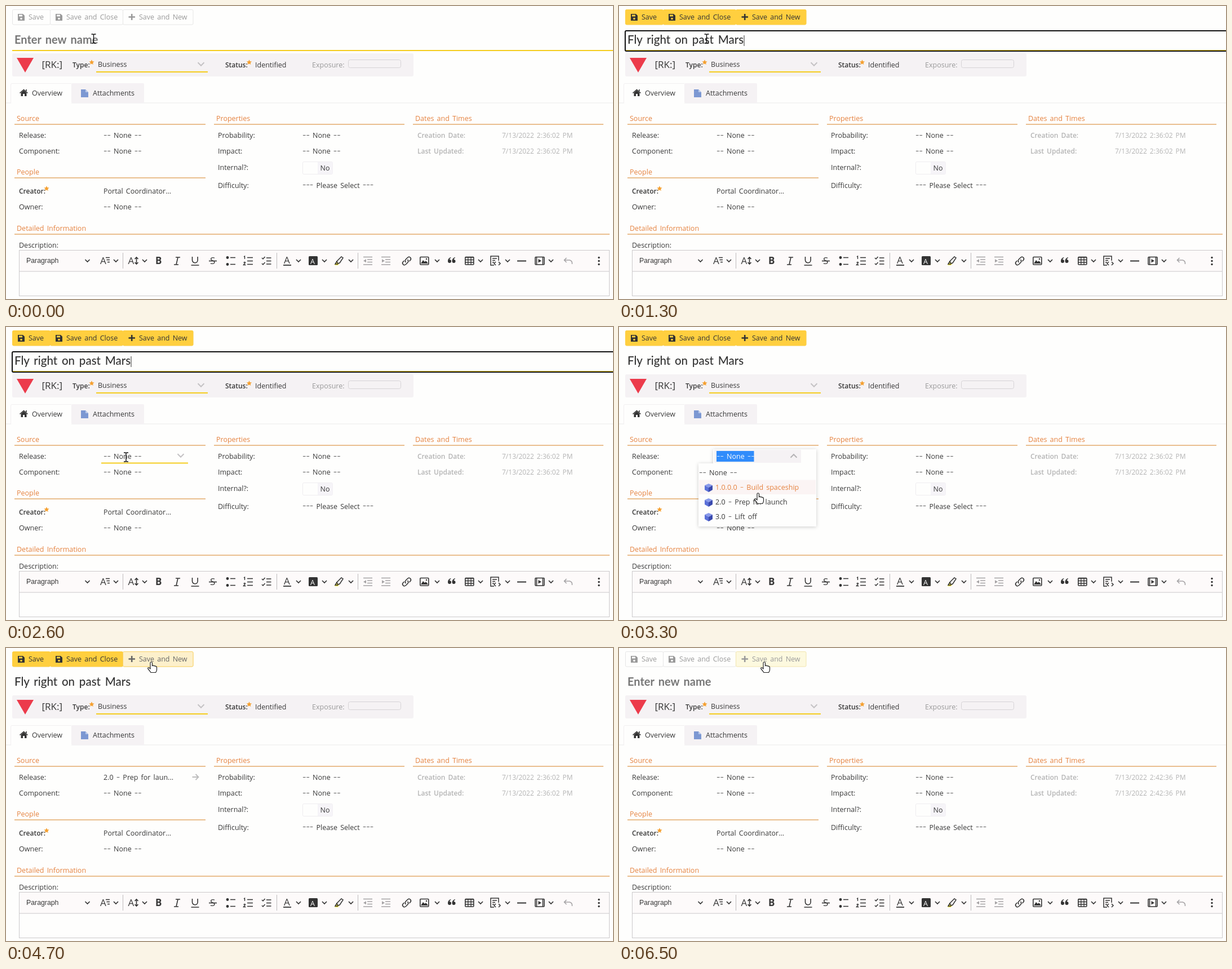
Recreate the animation shown at these times as an HTML page. Size 1077 px wide and 520 px high, loop 6.6 s.

```html
<!DOCTYPE html>
<html lang="en">
<head>
<meta charset="utf-8">
<title>New risk form</title>
<style>
html, body { margin: 0; width: 100%; height: 100%; overflow: hidden; background: #fefefd }
svg { display: block }
text { font: 12.5px "Open Sans", sans-serif; word-spacing: 1.9px; fill: #383838 }
.m { font-weight: 600; font-size: 12px }
.head { fill: #e5823f; font-weight: 500 }
.dim { fill: #b4b4b4 }
.date { fill: #b4b4b4; font-size: 12px }
.code { font-size: 17px }
.title { font: 500 20.5px Lato, sans-serif; word-spacing: 2.6px; fill: #333 }
.hint { font: 700 20px Lato, sans-serif; word-spacing: 2.4px; fill: #777 }
.para { font: 12.3px "Liberation Sans", sans-serif }
.glyph { font-size: 17px }
.bold { font-size: 17px; font-weight: 700 }
.dash { font-size: 20px; font-weight: 300 }
</style>
</head>
<body>
<svg width="1077" height="520" viewBox="0 0 1077 520"><g id="base"></g><g id="live"></g></svg>
<script>
const INK = '#333', GOLD = '#f5cd1e', PALE = '#f5f2f4';

const rect = (x, y, w, h, fill, more = '') =>
  `<rect x="${x}" y="${y}" width="${w}" height="${h}" fill="${fill}" ${more}/>`;
const line = (d, color = INK, w = 1.6) =>
  `<path d="${d}" fill="none" stroke="${color}" stroke-width="${w}"/>`;
const shape = (d, fill, more = '') => `<path d="${d}" fill="${fill}" ${more}/>`;
// Hyphens are set larger and lighter than the words around them.
const text = (x, y, s, cls = '', fill = '') =>
  `<text x="${x}" y="${y}" class="${cls}" ${fill && `style="fill:${fill}"`}>` +
  s.split(/(-+)/).map((part, i) => i % 2
    ? `<tspan class="dash" dy=".8">${part}</tspan>`
    : `<tspan dy="${i ? -.8 : 0}">${part}</tspan>`).join('') + '</text>';
const chevron = (x, y, r = 4, color = INK, dir = 1) =>
  line(`M${x - r} ${y - r / 2 * dir}l${r} ${r * dir}l${r} ${-r * dir}`, color, r > 4 ? 2 : 1.7);

function star(x, y) {
  const pts = Array.from({length: 10}, (_, i) => {
    const r = i % 2 ? 2.3 : 4.8, a = i * Math.PI / 5;
    return `${x + r * Math.sin(a)},${y - r * Math.cos(a)}`;
  });
  return `<polygon points="${pts}" fill="#f5a030"/>`;
}

const section = (x, y, w, s) =>
  text(x + 4, y, s, 'head') + rect(x, y + 5.3, w, 1.4, '#e3a562');

function header() {
  return rect(11, 84, 712, 41, PALE, 'rx="3"') +
    shape('M19 92H49L34 118Z', '#ec3b4b') +
    text(63.5, 110, '[RK:]', 'code') +
    text(118, 109, 'Type:', 'm') + star(152, 100) + text(163, 108, 'Business') +
    chevron(346, 103, 5.5, '#c4c2c4') + rect(160, 116, 198, 2, GOLD) +
    text(389, 109, 'Status:', 'm') + star(431.5, 100) + text(442, 109, 'Identified') +
    text(543, 109, 'Exposure:', '', '#999') +
    rect(607.5, 95.5, 93, 14, PALE, 'rx="3" stroke="#d6d3d6"');
}

function tabs() {
  return rect(0, 171.5, 1077, 1, '#ececec') +
    rect(8, 137, 109, 36, '#fefefd', 'rx="3"') +
    line('M8.5 172V140Q8.5 137.5 11 137.5H116', '#f2f0f1', 1) +
    rect(116, 137, 129, 35, PALE, 'rx="2"') +
    shape('M26.5 154L31.5 149.5L36.5 154V160H33V156H30V160H26.5Z', INK) +
    line('M24.5 154.5L31.5 148.5L38.5 154.5M36 148V151') +
    text(46, 159, 'Overview') +
    shape('M133 148H141L146 153V162H133Z', '#7c98d2') + shape('M141 148V153H146Z', '#b9c9ea') +
    text(154, 159, 'Attachments');
}

function fields() {
  const none = '-- None --';
  return section(15, 204, 339, 'Source') + section(15, 299, 339, 'People') +
    section(369, 204, 338, 'Properties') + section(722, 204, 338, 'Dates and Times') +
    section(15, 399, 1056, 'Detailed Information') +
    text(23, 234, 'Release:') + text(23, 262, 'Component:') + text(173, 262, none) +
    text(23, 333, 'Creator:', 'm') + star(72, 324) + text(173, 333, 'Portal Coordinator...') +
    text(23, 361, 'Owner:') + text(173, 361, none) +
    text(376, 234, 'Probability:') + text(526, 234, none) +
    text(376, 262, 'Impact:') + text(526, 262, none) +
    text(376, 290.5, 'Internal?:') +
    rect(526.5, 276.5, 53, 22, '#fefefd', 'rx="2" stroke="#efedf0"') +
    rect(553, 277, 26.5, 21, '#f6f4f8') + text(557.5, 292, 'No') +
    text(376, 322.5, 'Difficulty:') + text(526, 322.5, '--- Please Select ---') +
    text(730, 234, 'Creation Date:', 'm dim') + text(730, 262, 'Last Updated:', 'm dim') +
    text(23, 428.5, 'Description:');
}

function editor() {
  const gray = '#a5a3a5', rows = [446.5, 452.5, 458.5];
  const dots = (x, ys, r) => ys.map(y => `<circle cx="${x}" cy="${y}" r="${r}" fill="${INK}"/>`).join('');
  const frame = (x, w) => rect(x, 445.5, w, 13.5, 'none', `rx="1" stroke="${INK}" stroke-width="1.6"`);
  const indent = (x, dir) =>
    line(`M${x - 8} 445.5h16M${x - 1} 450h9M${x - 1} 454.5h9M${x - 8} 459h16`, gray) +
    shape(`M${x - 5 + 3 * dir} 452.3l${-5 * dir} -3v6Z`, gray);
  const quote = x => `M${x} 453a3 3 0 1 0 3-3q0-2 2.5-3l-.5-1q-5 1.5-5 7Z`;
  return rect(23.5, 433.5, 1047, 81, '#fefefd', 'stroke="#cbc9cb"') +
    rect(24, 434, 1046, 37, '#fdfafa') + rect(24, 470.5, 1046, 1, '#cbc9cb') +
    [207, 480, 624].map(x => rect(x, 438, 1, 28, '#bdbbbd')).join('') +
    text(36, 456, 'Paragraph', 'para') +
    [144.5, 195, 246, 519, 565, 612, 765, 842, 890, 967].map(x => chevron(x, 452)).join('') +
    text(167, 458, 'A', 'glyph') + line('M177 446.5h7M178.5 450.5h5.5M180 454.5h4') +
    text(216.5, 458, 'A', 'glyph') + line('M231.5 446v12M228.5 449l3-3 3 3M228.5 455l3 3 3-3') +
    text(265, 458, 'B', 'bold') +
    line('M301 446h8M298 459h8M305 446l-3 13') +
    line('M330.5 445v6a4.8 4.8 0 0 0 9.6 0v-6M328.5 460h14') +
    text(362, 458, 'S', 'glyph') + line('M360 452.5h14') +
    dots(393, [446.5, 458.5], 2.4) + line('M398 446.5h9M398 458.5h9') +
    line('M422 445l1.5-1v5M421.5 455.5q3-2 3 0l-3 4h4M428 446.5h10M428 452.5h10M428 458.5h10', INK, 1.4) +
    line('M454 447l2 2 3.5-4M454 457l2 2 3.5-4M462 447h8.5M462 452.5h8.5M462 458h8.5', INK, 1.5) +
    text(493, 457, 'A', 'glyph') + rect(492, 459, 14, 1.8, INK) +
    rect(537, 444, 16, 16, INK, 'rx="1.5"') + text(540, 457.5, 'A', '', '#fff') +
    shape('M583 460l4-6 4 3-2 3Z', '#f3e33c') +
    line('M587 453l8-8 3 2-6 9-3 1ZM587 453l-3 5h5', INK, 1.5) +
    indent(642, -1) + indent(674, 1) +
    line('M709.5 455q-2.5-3 0-5.5l3-3q3-2.5 5 0t0 4.5l-2 2M712.5 450q2.5 3 0 5.5l-3 3q-3 2.5-5 0t0-4.5l2-2') +
    frame(734.8, 15) + shape('M736 457l4-6 3 3 2-2 4 5Z', INK) + dots(746, [449], 1.3) +
    shape(quote(784) + quote(791.5), INK) +
    frame(814.8, 15) + line('M815 446h15M815 450.5h15M815 455h15M819.8 446v13M825 446v13', INK, 1.3) +
    line('M866 460h-6v-16h14v8M863 448h8M863 451.5h5M863 455h3', INK, 1.5) +
    line('M869 454l-3 3 3 3M874 454l3 3-3 3', INK, 1.5) +
    rect(907, 451.5, 16, 2, INK) +
    frame(939, 16) + line('M941.5 446v13M952.5 446v13') + shape('M944.5 449v6.5l5.5-3.2Z', INK) +
    line('M994.5 447l-4 4 4 4M991 451h9q5 1 4.5 7', gray) +
    dots(1052, rows, 1.7);
}

const floppy = (x, c, hole) =>
  shape(`M${x} 14h9l3 3v9h-12Z`, c) +
  rect(x + 2, 15.5, 6, 3, hole) + `<circle cx="${x + 6}" cy="22.5" r="1.8" fill="${hole}"/>`;

const button = (x, w, s, [fill, edge, ink]) =>
  rect(x + .5, 6.5, w, 26.5, fill, `rx="2" stroke="${edge}"`) +
  (s === 'Save and New'
    ? line('M217.5 19.5h11.5M223.2 14v11', ink, 2.6)
    : floppy(x + 10, ink, fill)) +
  text(x + 29, 24, s, '', ink);

const toolbar = (style, last = style) =>
  button(11, 67, 'Save', style) + button(78, 129, 'Save and Close', style) +
  button(207, 124.5, 'Save and New', last);

const OFF = ['#fefefd', '#e6e6e6', '#9a9a9a'], ON = ['#ffcf3f', '#ffcf3f', INK],
  HOVER = ['#fdf0cb', '#f9d267', '#666'], OFF_HOVER = ['#fdf9df', '#f2e5ae', '#9a9a9a'];

const clamp = v => Math.max(0, Math.min(1, v));

function buttons(t) {
  const lit = Math.min(clamp((t - 1000) / 300), clamp((5300 - t) / 200));
  const over = t >= 4600;
  return toolbar(OFF, over ? OFF_HOVER : OFF) +
    `<g opacity="${lit}">${toolbar(ON, over ? HOVER : ON)}</g>`;
}

function title(t) {
  const focused = t >= 600 && t < 2700, typed = t >= 1100 && t < 5800;
  return (t < 2700 ? rect(11, 78, 1066, 2, GOLD) : '') +
    (focused ? rect(11, 44, 1100, 36, 'none', 'rx="2" stroke="#111" stroke-width="2"') +
      rect(15, 78, 1062, 1, GOLD) + rect(typed ? 221.5 : 15, 52, 1, 19, INK) : '') +
    (typed ? text(15, 67, 'Fly right on past Mars', 'title') : text(15, 67, 'Enter new name', 'hint'));
}

function cube(x, y) {
  return shape(`M${x} ${y - 7}l7 3-7 4-7-4Z`, '#8a9bea') +
    shape(`M${x - 7} ${y - 4}l7 4v8l-7-4Z`, '#5b70d8') +
    shape(`M${x + 7} ${y - 4}l-7 4v8l7-4Z`, '#3a4aae');
}

function dropdown(t, y) {
  const items = ['1.0.0.0 - Build spaceship', '2.0 - Prep for launch', '3.0 - Lift off'];
  const hot = y < 245 ? -2 : Math.floor((y - 271) / 26);
  const marked = t < 3800;
  return shape('M167 217H350V354H141V242H167Z', '#fefefd', 'style="filter:drop-shadow(0 1px 3px #0003)"') +
    rect(169, 218, 154, 23, PALE) + chevron(310, 229, 5.5, '#b5b3b5', -1) +
    (marked ? rect(173, 220, 66.5, 19, '#318cfb') : '') +
    text(173, 234, '-- None --', '', marked ? '#fff' : '') +
    (hot > -2 ? rect(142, 271.5 + hot * 26, 207, 25.5, '#fbf4f4') : '') +
    text(142, 263, '-- None --', '', hot === -1 ? '#e5823f' : '') +
    items.map((s, i) => cube(159, 285 + i * 26) +
      text(171, 289 + i * 26, s, '', hot === i ? '#e5823f' : '')).join('');
}

function release(t, y) {
  if (t >= 2700 && t < 4000) return dropdown(t, y);
  if (t >= 4000 && t < 5800) return text(173, 234, '2.0 - Prep for laun...') +
    line('M330.5 229h10.5M336.5 224l5 5-5 5', '#bcbcbc', 1.8);
  const hover = t >= 2300 && t < 2700;
  return text(173, 234, '-- None --') +
    (hover ? chevron(310, 228, 5.5, '#c4c2c4') + rect(169, 240.5, 154, 2, GOLD) : '');
}

const PATH = [[0, 155.5, 58], [1500, 155.5, 58], [2300, 213, 231], [2700, 213, 231],
  [3200, 247, 294.5], [3300, 247, 294.5], [3600, 247, 306], [3900, 247, 306],
  [4600, 258, 24.5], [4700, 258, 24.5], [4800, 258, 22], [6300, 258, 22], [6500, 258, 24.5], [6600, 258, 24.5]];

function pointer(t) {
  const i = PATH.findIndex(k => k[0] > t);
  const [t0, x0, y0] = PATH[i - 1], [t1, x1, y1] = PATH[i];
  const u = (t - t0) / (t1 - t0), e = u * u * (3 - 2 * u);
  return [x0 + (x1 - x0) * e, y0 + (y1 - y0) * e];
}

function cursor(t, x, y) {
  const beam = t < 2700 && (y < 80 || y > 218);
  const hand = t < 4000 ? t >= 2700 && y > 242 : y < 33;
  const body = beam
    ? line('M-4 -8h2.5q1.5 0 1.5 1.5v13q0 1.5-1.5 1.5h-2.5M4 -8h-2.5q-1.5 0-1.5 1.5M4 8h-2.5q-1.5 0-1.5-1.5', '#111', 1.4)
    : shape(hand
      ? 'M-2 1.5Q0-1 1.5 1.5V7q2-1.5 3 .5q2-1 3 .8q2-.6 2 2V14q0 3-2 5H-1q-2-3-5-6.5q-1-2.5 1.5-2.2l2.5 2Z'
      : 'M0 0V16L4 12.5L6.5 18L9 17L6.5 11.5H11.5Z', '#fff', 'stroke="#222" stroke-width="1.2"');
  return `<g transform="translate(${x} ${y})">${body}</g>`;
}

const base = document.getElementById('base'), live = document.getElementById('live');
base.innerHTML = header() + tabs() + fields() + editor();

let shown = -1;
function draw(now) {
  const t = Math.floor(now % 6600 / 100) * 100; // ten steps a second
  if (t !== shown) {
    shown = t;
    const [x, y] = pointer(t);
    const stamp = t < 5800 ? '7/13/2022 2:36:02 PM' : '7/13/2022 2:42:36 PM';
    live.innerHTML = buttons(t) + title(t) +
      text(880, 234, stamp, 'date') + text(880, 262, stamp, 'date') +
      release(t, y) + cursor(t, x, y);
  }
  requestAnimationFrame(draw);
}
draw(performance.now());
</script>
</body>
</html>
```
